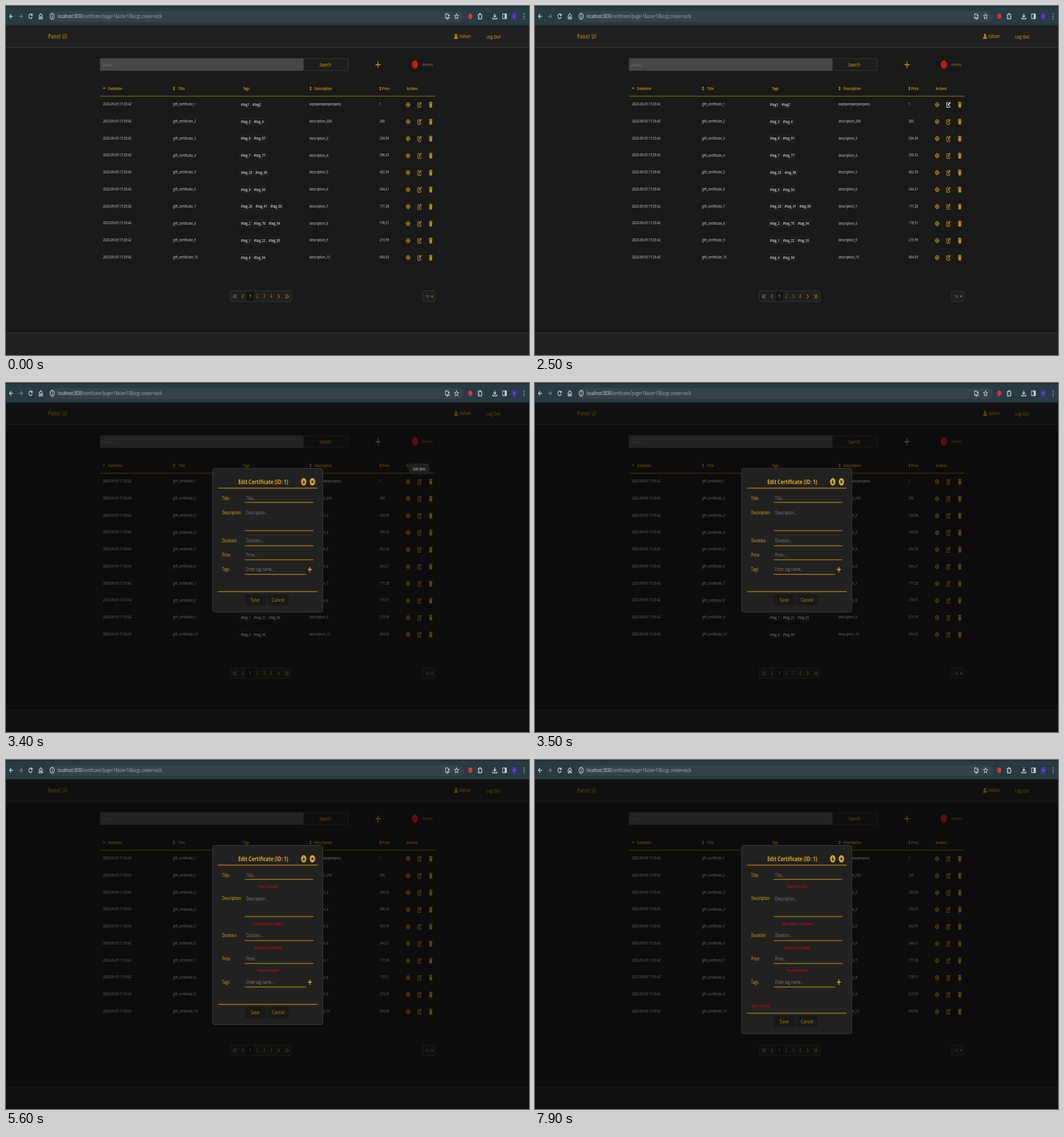
Recreate the animation shown at these times as an HTML page with a canvas. Size 917x611 px, loop 8 s.

```html
<!DOCTYPE html>
<html lang="en">
<head>
<meta charset="utf-8">
<title>Certificates</title>
<style>
html, body { margin: 0; height: 100%; overflow: hidden; background: #181919; }
canvas { display: block; }
</style>
</head>
<body>
<canvas id="stage" width="917" height="611"></canvas>
<script>
const ctx = document.getElementById('stage').getContext('2d');
const LOOP = 8000;
const SX = 0.727; // the whole screen is squeezed horizontally
const GOLD = '#ba8b10', BRIGHT = '#dfa922', TEXT = '#d6d6d6', PAGE = '#181919';
const FONT = '"Open Sans", "Noto Sans", sans-serif';

const ROWS = [
  ['wqeqweqweqweqweq', '1', '1', '2'],
  ['description_200', '200', '_3', '_4'],
  ['description_3', '234.56', '_6', '_97'],
  ['description_4', '296.33', '_7', '_77'],
  ['description_5', '452.59', '_33', '_98'],
  ['description_6', '244.21', '_9', '_50'],
  ['description_7', '177.28', '_20', '_41', '_56'],
  ['description_8', '178.51', '_2', '_70', '_94'],
  ['description_9', '219.59', '_1', '_22', '_55'],
  ['description_10', '454.93', '_4', '_94']
];

// label, placeholder, text y, underline y, underline end
const FIELDS = [
  ['Title', 'Title...', 202, 209, 539],
  ['Description', 'Description...', 227, 258.5, 539],
  ['Duration', 'Duration...', 276, 285, 539],
  ['Price', 'Price...', 301, 309.5, 539],
  ['Tags', 'Enter tag name...', 326.5, 335, 526]
];

function at(x, y, draw) {
  ctx.save();
  ctx.translate(x, y);
  ctx.scale(SX, 1);
  draw();
  ctx.restore();
}

// Writes text centred on y and returns its width on the stage.
function text(str, x, y, size, color, weight = 400, align = 'left', spacing = 0) {
  let width;
  at(x, y + size * 0.34, () => {
    ctx.font = `${weight} ${size}px ${FONT}`;
    ctx.letterSpacing = spacing + 'px';
    ctx.textAlign = align;
    ctx.fillStyle = color;
    ctx.fillText(str, 0, 0);
    width = ctx.measureText(str).width * SX;
  });
  return width;
}

function rect(x, y, w, h, color) {
  ctx.fillStyle = color;
  ctx.fillRect(x, y, w, h);
}

function box(x, y, w, h, r, fill, border) {
  ctx.beginPath();
  ctx.roundRect(x, y, w, h, r);
  if (fill) { ctx.fillStyle = fill; ctx.fill(); }
  if (border) { ctx.strokeStyle = border; ctx.lineWidth = 1; ctx.stroke(); }
}

function fill(x, y, d, color) {
  at(x, y, () => { ctx.fillStyle = color; ctx.fill(new Path2D(d)); });
}

function line(x, y, d, color, width = 1.3) {
  at(x, y, () => {
    ctx.strokeStyle = color;
    ctx.lineWidth = width;
    ctx.stroke(new Path2D(d));
  });
}

function disc(x, y, r, color) {
  at(x, y, () => {
    ctx.beginPath();
    ctx.arc(0, 0, r, 0, 7);
    ctx.fillStyle = color;
    ctx.fill();
  });
}

function plus(x, y, r, color, width) {
  line(x, y, `M${-r} 0H${r}M0 ${-r}V${r}`, color, width);
}

function eye(x, y) {
  fill(x, y, 'M-5.5 0Q0-8.5 5.5 0Q0 8.5-5.5 0Z', GOLD);
  disc(x, y, 2.7, PAGE);
  disc(x, y, 1.6, GOLD);
}

function pencil(x, y, color) {
  line(x, y, 'M0-3.5H-3.5Q-4.5-3.5-4.5-2.5V3.5Q-4.5 4.5-3.5 4.5H2.5Q3.5 4.5 3.5 3.5V1', color);
  line(x, y, 'M-1.5 1.6L4.4-4.4', color, 2.3);
}

function trash(x, y) {
  fill(x, y, 'M-4.2-4.2H4.2V-2.8H-4.2ZM-1.6-5.2H1.6V-4H-1.6ZM-3.6-2.2H3.6L3.1 5H-3.1Z', GOLD);
}

function sorter(x, y) {
  fill(x, y, 'M-2.6-.4L0-4L2.6-.4ZM-2.6.4L0 4L2.6.4Z', GOLD);
}

function browser() {
  const ink = '#d3dadd';
  rect(0, 0, 917, 34, '#283a42');
  rect(0, 0, 917, 1.5, '#1d272b');
  box(75, 9, 728, 19, 9, '#354349');
  line(9, 18, 'M4.5 0H-4M0-4L-4 0L0 4', ink, 1.5);
  line(26, 18, 'M-4.5 0H4M0-4L4 0L0 4', '#76838a', 1.4);
  line(43, 18, 'M3.6-2A4 4 0 1 0 4 1M4.2-4.6V-1.4H1', ink, 1.5);
  line(61, 18, 'M-4 0V4.5H-1.3V1H1.3V4.5H4V-1L0-4.5L-4-1Z', ink, 1.4);
  line(81, 18, 'M5 0A5 5 0 1 1-5 0A5 5 0 1 1 5 0M0-1V3M0-3V-1.8', ink);
  const w = text('localhost:3030', 91, 18, 8.7, '#e0e5e7');
  text('/certificates?page=1&size=10&scgc.create=asclk', 91 + w, 18, 8.7, '#a3aeb3');
  line(774, 18, 'M1-4H-4.5V3H4.5V1M-2 4.8H2M3-4.5V0M1-2L3 0L5-2', ink);
  line(790, 18, 'M0-4.6L1.4-1.5L4.8-1.2L2.2 1L3 4.4L0 2.6L-3 4.4L-2.2 1L-4.8-1.2L-1.4-1.5Z', ink, 1.1);
  disc(814, 18, 5, '#d8323c');
  line(831, 18, 'M-4-3H-1V-4.5H1.5V-3H4V0H5V2H4V4.5H-4V2H-2.6V-.4H-4Z', ink);
  line(857, 18, 'M0-5V1.5M-3-1.5L0 1.8L3-1.5M-5 2V4.5H5V2', ink, 1.5);
  line(874, 18, 'M-4.5-4.2H4.5V4.2H-4.5Z', ink);
  rect(874.5, 14, 3, 8, ink);
  disc(891, 18, 6.5, '#4630ae');
  text('V', 891, 18, 6, '#cfc8f0', 400, 'center');
  for (const dy of [-4, 0, 4]) disc(908.5, 18 + dy, 1.1, ink);
}

function page(t) {
  rect(0, 34, 917, 577, PAGE);
  rect(0, 34, 917, 38, '#202020');
  rect(0, 72, 917, 1.2, '#383838');
  rect(0, 572, 917, 39, '#202020');
  rect(0, 572, 917, 1.2, '#353535');
  text('Panel UI', 74, 53.5, 10, GOLD, 600, 'left', 0.8);
  disc(789, 51, 2.5, GOLD);
  fill(789, 53.5, 'M-4.5 4V2.5Q-4.5 0-2 0H2Q4.5 0 4.5 2.5V4Z', GOLD);
  text('nolum', 795, 53.5, 8.7, GOLD, 600);
  text('Log Out', 842, 53.5, 9, GOLD, 600);

  rect(164.7, 91.5, 357, 22, '#474747');
  text('Search...', 168.5, 103, 7.6, '#777');
  box(521.5, 92, 78.5, 21, 1.5, '#1d1d1d', '#393939');
  text('Search', 560, 103, 8.8, GOLD, 600, 'center');
  plus(652.3, 102.7, 6, GOLD, 2);
  disc(717, 102.5, 7.2, '#cb191b');
  line(717, 102.5, 'M0-3.5V1M0 2.2V3.6', '#860f10', 1.4);
  text('4 errors', 730, 102.5, 6.8, GOLD);

  const heads = [['Datetime', 179], ['Title', 302], ['Tags', 415.5], ['Description', 541], ['Price', 659.5], ['Actions', 702.5]];
  for (const [name, x] of heads) text(name, x, 144.5, 7.3, GOLD, 700);
  fill(172, 143.5, 'M-2.6 1.6L0-2L2.6 1.6Z', GOLD);
  for (const x of [294.5, 534, 656.5]) sorter(x, 144.5);
  rect(165, 157.2, 588, 1.4, '#7f5e0f');

  ROWS.forEach(([desc, price, ...tags], i) => {
    const y = 172 + 29.75 * i;
    text('2023-09-05 17:29:42', 170, y - 0.3, 7.3, TEXT, 500);
    text('gift_certificate_' + (i + 1), 293, y, 7.3, TEXT, 500);
    let x = 412;
    for (const tag of tags) {
      const w = text('#tag' + tag, x, y + 0.3, 7.3, TEXT, 600);
      box(x - 2, y - 5.5, w + 4, 12, 1.5, null, '#272727');
      x += w + 6;
    }
    text(desc, 532, y, 7.3, TEXT, 500);
    text(price, 655, y - 0.3, 7.3, TEXT, 500);
    eye(705, y + 0.8);
    pencil(725, y + 0.8, i === 0 && t >= 2500 && t < 3400 ? '#e6e6e6' : GOLD);
    trash(744.7, y + 0.8);
  });

  box(393.5, 498.5, 106.5, 19, 2, '#202020', '#333');
  rect(422, 499, 13, 18, '#131313');
  const left = 'M1.6-3.6L-1.8 0L1.6 3.6', right = 'M-1.6-3.6L1.8 0L-1.6 3.6';
  for (const x of [399.8, 403, 415.5]) line(x, 508.5, left, '#8d8570');
  for (const x of [478, 490.8, 494]) line(x, 508.5, right, GOLD);
  [428.5, 440.5, 453, 465].forEach((x, i) =>
    text(String(i + 1), x, 508.5, 8.2, GOLD, i ? 400 : 700, 'center'));
  box(730.5, 498.5, 21.5, 19, 2, '#202020', '#333');
  text('10', 735.5, 508.5, 8, GOLD);
  fill(747, 508.5, 'M-2.4-1.5H2.4L0 2Z', GOLD);
}

function tooltip(alpha) {
  ctx.globalAlpha = alpha;
  box(706.5, 141, 35.5, 18.5, 2, '#202020');
  fill(724.5, 159.5, 'M-4 0H4L0 3.5Z', '#202020');
  text('Edit Item', 724.5, 150.3, 7.2, '#d4d4d4', 400, 'center');
  ctx.globalAlpha = 1;
}

function button(name, x, w, y, hover) {
  box(x, y - 9.5, w, 19, 1.5, hover ? '#4b4b4b' : '#191919');
  text(name, x + w / 2, y, 9.8, hover ? '#d0c6a8' : GOLD, 400, 'center');
}

function dialog(t) {
  const rule = '#a87d14', red = '#c30f12';
  const step = t >= 5600 ? 15.6 : 0;
  const tagError = t >= 7800;
  const shift = 4 * step + (tagError ? step : 0);
  box(362.5, 149.5, 193, 251.5 + shift, 3, '#212121', '#3d3d3d');
  text('Edit Certificate (ID: 1)', 451, 173, 11.4, BRIGHT, 700, 'center');
  disc(522, 173, 6.4, BRIGHT);
  line(522, 173, 'M0-3.5V2M-2.6 0L0 2.8L2.6 0', '#212121', 1.7);
  disc(537.2, 173, 6.4, BRIGHT);
  line(537.2, 173, 'M-2.2-2.2L2.2 2.2M2.2-2.2L-2.2 2.2', '#212121', 1.7);
  rect(372, 183.3, 174, 1.5, rule);

  FIELDS.forEach(([label, hint, y, base, end], i) => {
    const dy = i * step;
    text(label, 379, y + dy, 8.2, GOLD, 600);
    text(hint, 421, y + dy, 8.6, '#7d7d7d');
    rect(418.5, base + dy - 0.7, end - 418.5, 1.4, rule);
    if (step && i < 4) text(label + ' is invalid', 459.5, base + dy + 12, 7.4, red, 600, 'center');
  });
  plus(532.8, 326.5 + 4 * step, 4.8, t >= 7200 && t < 7900 ? '#e6e6e6' : BRIGHT, 1.8);
  if (tagError) text('Tag is invalid', 379, 430.5, 7.4, red, 600);
  rect(372, 364.6 + shift, 174, 1.5, rule);
  button('Save', 418.5, 37, 379.5 + shift, t >= 4700 && t < 5600);
  button('Cancel', 458.5, 37, 379.5 + shift, false);
}

function frame(now) {
  const t = now % LOOP;
  page(t);
  if (t >= 3400) {
    rect(0, 34, 917, 577, 'rgba(0, 0, 0, 0.5)');
    dialog(t);
  }
  if (t >= 2600 && t < 3500) tooltip(t < 2700 ? 0.5 : 1);
  browser();
  requestAnimationFrame(frame);
}
requestAnimationFrame(frame);
</script>
</body>
</html>
```
